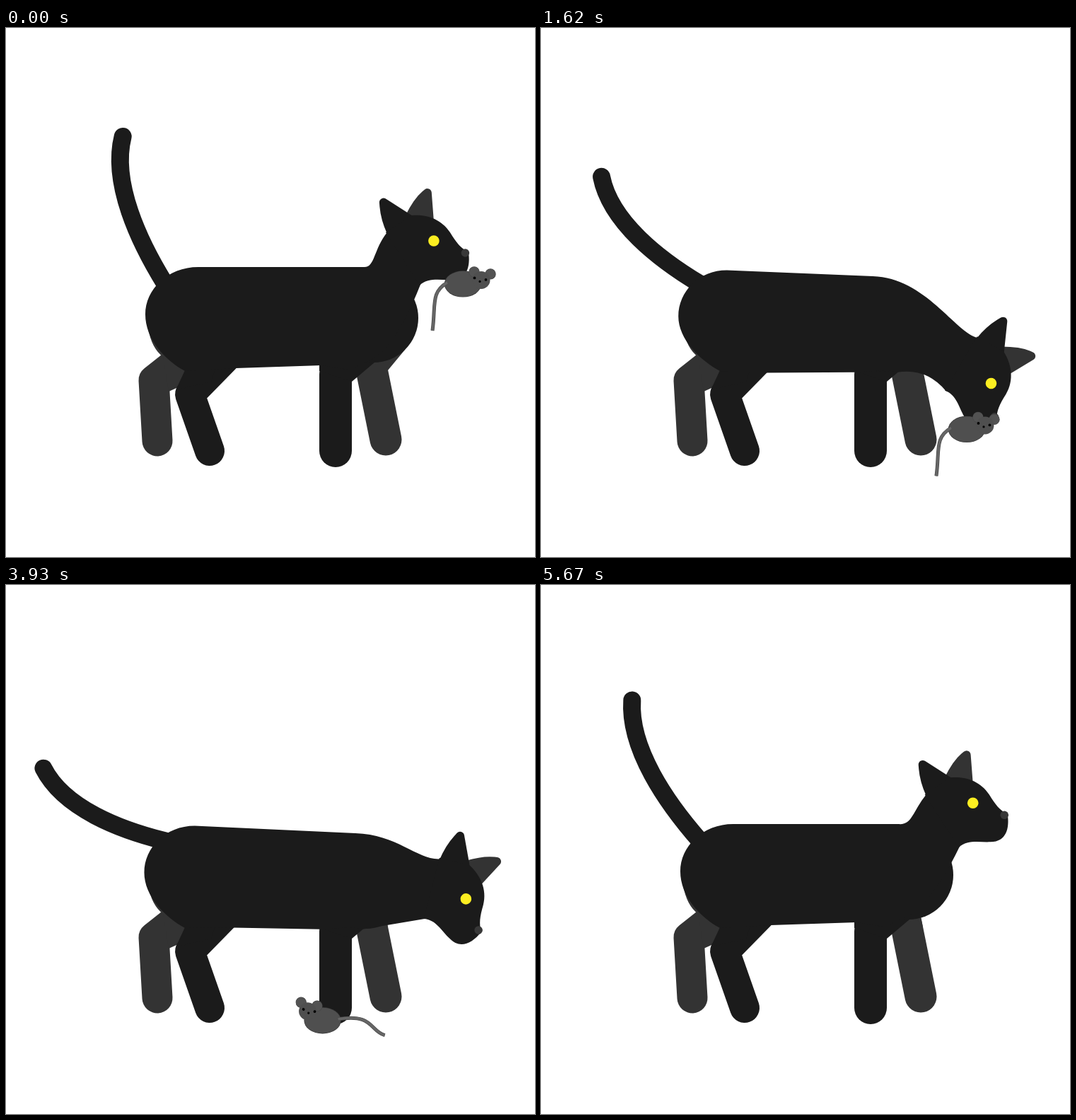
Recreate the animation shown at these times as an HTML page with a canvas. Size 748 by 748 pixels, loop 5.7 s.

```html
<!DOCTYPE html>
<html lang="en">
<head>
<meta charset="utf-8">
<title>Cat and mouse</title>
<style>
html, body { margin: 0; width: 100%; height: 100%; overflow: hidden; background: #fff; }
canvas { display: block; width: 748px; height: 748px; }
</style>
</head>
<body>
<canvas id="stage" width="748" height="748"></canvas>
<script>
const ctx = document.getElementById('stage').getContext('2d');
const LOOP = 5700, STEP = 30;
const NEAR = '#1b1b1b', FAR = '#333', FUR = '#4f4f4f';
const SHOULDER = [453, 428], TAIL_ROOT = [225, 362];

// time, then neck angle and head turn in degrees
const HEAD_KEYS = [[330, [-39.9, 0]], [960, [0, 39.5]], [1090, [8.8, 49]], [1620, [22.1, 63.4]],
  [1900, [29.2, 69]], [3560, [29.2, 69]], [3930, [4.6, 47.2]], [4570, [-37.2, 0]]];
// time, then lean from upright in degrees and length
const TAIL_KEYS = [[890, [16, 217]], [1620, [42.6, 206]], [2010, [52.7, 205]], [3060, [42.9, 209]],
  [3600, [41.3, 209]], [3880, [60.6, 200]], [4440, [44.2, 205]], [4860, [31.8, 239]],
  [5080, [27.1, 237]], [5670, [25.8, 221]]];
const DROP_KEYS = [[1620, 0], [1900, 5], [2640, 5], [3240, 31]];

const rad = d => d * Math.PI / 180;
const clamp = x => Math.min(1, Math.max(0, x));
const mix = (a, b, f) => Array.isArray(a) ? a.map((v, i) => mix(v, b[i], f)) : a + (b - a) * f;

function polar([x, y], radius, degrees) {
  return [x + radius * Math.cos(rad(degrees)), y + radius * Math.sin(rad(degrees))];
}

function track(keys, t) {
  const i = keys.findIndex(k => t <= k[0]);
  if (i < 0) return keys[keys.length - 1][1];
  if (i === 0) return keys[0][1];
  const [t0, a] = keys[i - 1], [t1, b] = keys[i];
  return mix(a, b, (t - t0) / (t1 - t0));
}

function fill(color, path) {
  ctx.beginPath();
  path();
  ctx.closePath();
  ctx.fillStyle = color;
  ctx.fill();
}

function line(p) {
  for (let i = 0; i < p.length; i += 2) ctx.lineTo(p[i], p[i + 1]);
}

const poly = (color, ...p) => fill(color, () => line(p));

function dot(color, x, y, r, ry = r) {
  fill(color, () => ctx.ellipse(x, y, r, ry, 0, 0, 2 * Math.PI));
}

function stroke(color, width, path, cap = 'round') {
  ctx.beginPath();
  path();
  ctx.strokeStyle = color;
  ctx.lineWidth = width;
  ctx.lineCap = cap;
  ctx.lineJoin = 'round';
  ctx.stroke();
}

const limb = (color, width, ...p) => stroke(color, width, () => line(p));

function farLegs(t) {
  limb(FAR, 43, 214, 584, 209, 498, 252, 464);
  poly(FAR, 230, 514, 248, 506, 262, 470, 222, 463);
  fill(FAR, () => {
    ctx.moveTo(201, 425);
    ctx.quadraticCurveTo(206, 453, 222, 465);
    line([255, 488, 265, 430]);
  });
  limb(FAR, 45, 537, 582, 515, 473);
  const elbow = mix([564, 455], [537, 470], clamp(t / 900));
  poly(FAR, 540, 484, ...elbow, 520, 455);
}

function nearLegs() {
  limb(NEAR, 42, 288, 598, 260, 518, 310, 467);
  poly(NEAR, 253, 484, 240, 512, 290, 500, 300, 470);
  limb(NEAR, 46, 466, 598, 466, 490);
  poly(NEAR, 443, 485, 489, 500, 521, 473, 500, 440, 443, 440);
}

function catTail([lean, length]) {
  ctx.save();
  ctx.translate(...TAIL_ROOT);
  ctx.rotate(rad(-lean));
  stroke(NEAR, 25, () => {
    ctx.moveTo(0, 0);
    ctx.bezierCurveTo(-19, -.31 * length, -34, -.73 * length, 0, -length);
  });
  ctx.restore();
}

// sag grows as the head goes down; place maps head coordinates to the stage
function torso(sag, place) {
  const rump = [272 - 10 * sag, 338 + 5 * sag], left = 197 - 3 * sag;
  const sink = 13 * clamp(2.2 * sag);
  const withers = [505 - 42 * sag * sag, 338 + sink];
  const nape = place(-66, -12), throat = place(-19, 62);
  dot(NEAR, withers[0] + 15, withers[1] + 72, 63);
  fill(NEAR, () => {
    ctx.moveTo(...rump);
    ctx.lineTo(...withers);
    ctx.bezierCurveTo(mix(withers[0], nape[0], .5), withers[1] + 2, ...place(-86, 13), ...nape);
    ctx.lineTo(...throat);
    ctx.quadraticCurveTo(545, 467 + sink, 503, 474 + sink);
    line([490, 484, 446 - 3 * sag, 477 + .75 * sink, 325 - 7 * sag, 481 + 7 * sag, 253, 485]);
    ctx.bezierCurveTo(225, 470, left, 440, left, 405 + 3 * sag);
    ctx.bezierCurveTo(left, 370 + 3 * sag, 228 - 5 * sag, rump[1], ...rump);
  });
}

function ear(color, base, bend, tip, end) {
  fill(color, () => {
    ctx.moveTo(...base);
    ctx.quadraticCurveTo(...bend, ...mix(bend, tip, .5));
    ctx.arcTo(...tip, ...end, 6);
    ctx.lineTo(...end);
  });
}

function head() {
  ear(NEAR, [-66, -10], [-75, -30], [-78, -66], [-28, -34]);
  fill(NEAR, () => {
    ctx.moveTo(-68, -12);
    ctx.lineTo(-32, -36);
    ctx.bezierCurveTo(-12, -38, 10, -32, 23, -12);
    ctx.bezierCurveTo(32, 3, 38, 10, 49, 16);
    ctx.bezierCurveTo(52, 36, 47, 55, 25, 55);
    ctx.bezierCurveTo(10, 56, -8, 51, -20, 63);
  });
  dot('#383838', 44.5, 17, 5.8);
  dot('#fcee21', 0, 0, 7.8);
}

function atHead(eye, turn, paint) {
  ctx.save();
  ctx.translate(...eye);
  ctx.rotate(rad(turn));
  paint();
  ctx.restore();
}

// run goes from 0, hanging, to 1, fleeing to the left
function mouse(x, y, run) {
  ctx.save();
  ctx.beginPath();
  ctx.rect(28, 0, 720, 748);
  ctx.clip();
  ctx.translate(x, y);
  if (run > 0) ctx.scale(-1, 1);

  dot('#333', 0, 0, 26.2, 18.7);
  dot(FUR, 0, 0, 25.6, 18.1);

  const bend = mix([-46, 12, -38, 30, -43, 66], [-72, -10, -66, 14, -88, 21], run);
  for (const [color, width] of [['#484848', 5], ['#666', 3.6]]) {
    stroke(color, width, () => {
      ctx.moveTo(-22, -2);
      ctx.bezierCurveTo(...bend);
    }, 'butt');
  }

  ctx.translate(-1.5 * run, run);
  ctx.rotate(rad(-20 * run));
  for (const [ex, ey] of [[16, -17], [39, -14]]) {
    dot('#444', ex, ey, 7.7);
    dot('#535353', ex, ey, 7.2);
  }
  dot(FUR, 26, -5.5, 12.5);
  dot('#000', 16.5, -8.5, 1.9);
  dot('#000', 32.5, -6, 1.9);
  dot('#000', 24, -3.5, 1.6);
  ctx.restore();
}

function draw(t) {
  const [angle, turn] = track(HEAD_KEYS, t);
  const eye = polar(SHOULDER, 198, angle);
  const place = (x, y) => polar(polar(eye, x, turn), y, turn + 90);

  ctx.fillStyle = '#fff';
  ctx.fillRect(0, 0, 748, 748);
  farLegs(t);
  atHead(eye, turn, () => ear(FAR, [-40, -36], [-28, -60], [-4, -80], [0, -28]));
  catTail(track(TAIL_KEYS, t));
  nearLegs();
  torso(clamp((turn / 66) ** 2), place);
  atHead(eye, turn, head);

  const held = polar(SHOULDER, 204, track(HEAD_KEYS, Math.min(t, 2640))[0] + 21);
  const dash = Math.max(0, t - 3600);
  mouse(held[0] - .412 * dash, held[1] + track(DROP_KEYS, t), clamp(dash / 320));
}

const start = performance.now();
function frame() {
  const t = (performance.now() - start) % LOOP;
  draw(Math.floor(t / STEP) * STEP);
  requestAnimationFrame(frame);
}
frame();
</script>
</body>
</html>
```
